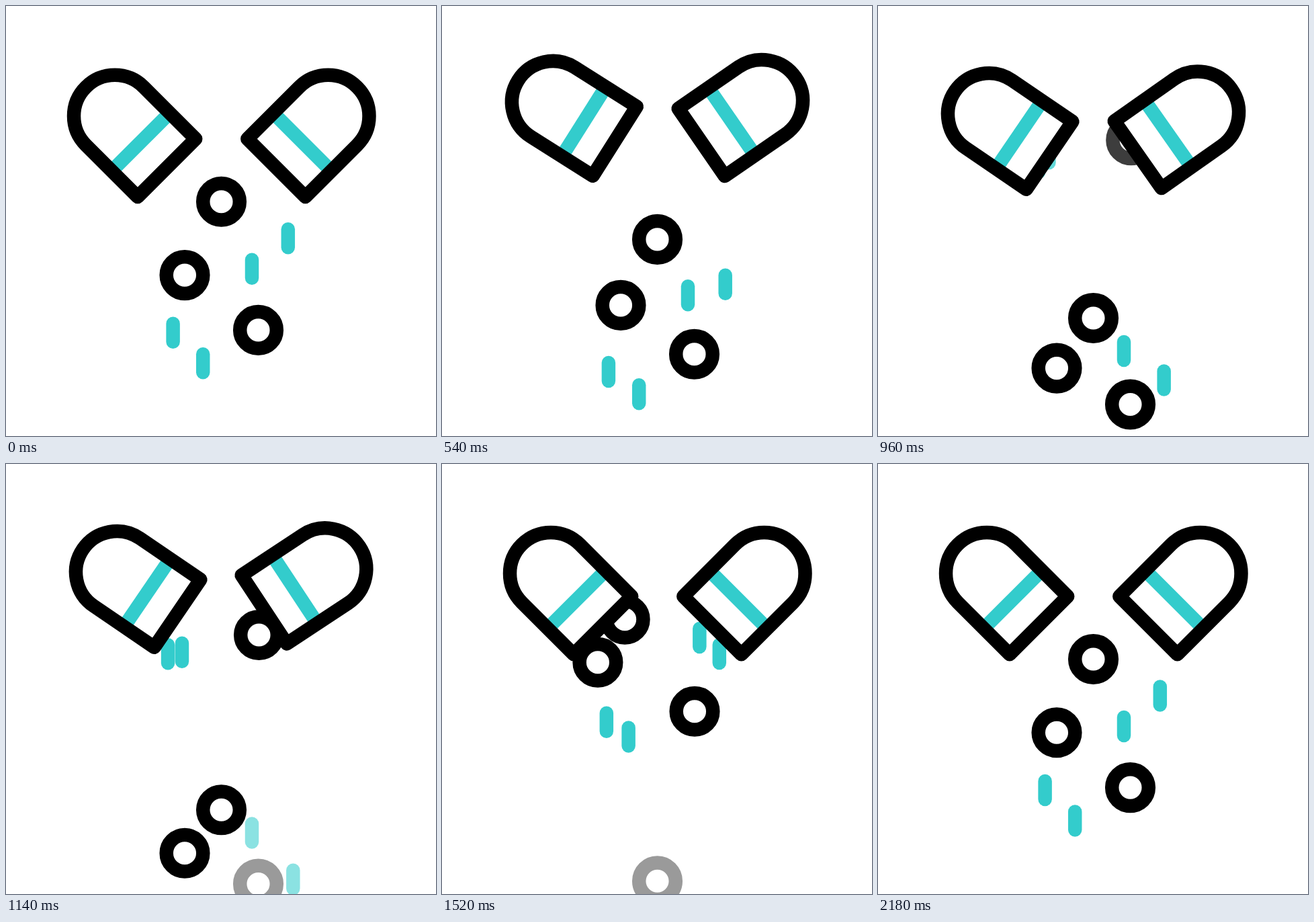
These frames come from a looping animation (640x640 px, 2420 ms). An HTML page with a canvas:

```html
<!DOCTYPE html>
<html lang="en">
<head>
<meta charset="utf-8">
<title>Opening capsule</title>
<style>
  html, body { margin: 0; height: 100%; overflow: hidden; background: #fff; }
  canvas { display: block; }
</style>
</head>
<body>
<canvas id="stage" width="640" height="640"></canvas>
<script>
const ctx = document.getElementById('stage').getContext('2d');
const LOOP = 2420, FALL = 340, LAND = 2180, LINE = 20.5;
const BLACK = '#000', TEAL = '#3cc';

// x, y: resting place; vx, vy: fall speed in px/ms; fade: start of fade-out;
// enter, dx, dy: when and from which offset the replacement leaves its capsule
const grains = [
  { ball: true, x: 320.5, y: 290.5, vx: 0, vy: .279, fade: 1400, enter: 1180, dx: -86.5, dy: -106 },
  { ball: true, x: 266, y: 399.8, vx: 0, vy: .223, fade: 1205, enter: 1180, dx: -61, dy: -187 },
  { ball: true, x: 375.5, y: 481.6, vx: 0, vy: .178, fade: 1020, enter: 900, dx: 1.3, dy: -298 },
  { x: 366, y: 390.4, vx: 0, vy: .197, fade: 1055, enter: 1180, dx: 31, dy: -236 },
  { x: 419.8, y: 345, vx: .0094, vy: .34, fade: 1055, enter: 1180, dx: -12.5, dy: -112 },
  { x: 248.6, y: 485.5, vx: -.0035, vy: .289, fade: 1055, enter: 900, dx: -9.9, dy: -266 },
  { x: 293.2, y: 531, vx: 0, vy: .228, fade: 1055, enter: 900, dx: -41, dy: -329 }
];

// Keys: time, centre x, centre y, tilt in degrees
const leftKeys = [
  [340, 162, 163, 45], [540, 165, 143, 32.3], [740, 165, 161, 34.3],
  [1140, 165, 161, 34.3], [1240, 165, 156.5, 31.5], [1440, 162, 163, 45]
];
const rightKeys = [
  [340, 479.5, 163, 45], [540, 476, 141, 34.6], [740, 476, 158.5, 35.1],
  [1060, 476, 158.5, 35.1], [1220, 474.5, 154.5, 31.8], [1460, 479.5, 163, 45]
];

const clamp = v => Math.max(0, Math.min(1, v));
const smooth = p => p * p * (3 - 2 * p);

// Share of the way still to go: linear start, soft landing
function remaining(t, start) {
  const w = clamp((LAND - t) / (LAND - start));
  let u = w;
  for (let i = 0; i < 16; i++) u = w - .5 * u * u * (1 - u);
  return u * u * (2.5 - 1.5 * u);
}

function pose(keys, t) {
  let i = 0;
  while (i < keys.length - 2 && t >= keys[i + 1][0]) i++;
  const [a, b] = [keys[i], keys[i + 1]];
  const p = smooth(clamp((t - a[0]) / (b[0] - a[0])));
  return a.slice(1).map((v, k) => v + (b[k + 1] - v) * p);
}

function stroke(color, cap = 'round') {
  ctx.strokeStyle = color;
  ctx.lineCap = cap;
  ctx.stroke();
}

function drawGrain(grain, x, y, alpha) {
  ctx.globalAlpha = alpha;
  ctx.beginPath();
  if (grain.ball) {
    ctx.arc(x, y, 27.3, 0, 2 * Math.PI);
    stroke(BLACK);
  } else {
    ctx.moveTo(x, y - 13.5);
    ctx.lineTo(x, y + 13.5);
    stroke(TEAL);
  }
  ctx.globalAlpha = 1;
}

function drawCapsule([x, y, tilt], flip, shift) {
  ctx.save();
  ctx.translate(x, y + shift);
  ctx.scale(flip, 1);
  ctx.rotate(tilt * Math.PI / 180);
  const shell = new Path2D();
  shell.arc(0, 0, 61, Math.PI / 2, Math.PI * 1.5);
  shell.lineTo(109, -61);
  shell.lineTo(109, 61);
  shell.closePath();
  ctx.fillStyle = '#fff';
  ctx.fill(shell);
  ctx.beginPath();
  ctx.moveTo(54.5, -61);
  ctx.lineTo(54.5, 61);
  stroke(TEAL, 'butt');
  ctx.strokeStyle = BLACK;
  ctx.stroke(shell);
  ctx.restore();
}

function draw(t) {
  ctx.fillStyle = '#fff';
  ctx.fillRect(0, 0, 640, 640);
  ctx.lineWidth = LINE;
  ctx.lineJoin = 'round';

  for (const g of grains) {
    const fallen = Math.max(0, t - FALL);
    const alpha = 1 - clamp((t - g.fade) / 200);
    if (alpha > 0) drawGrain(g, g.x + g.vx * fallen, g.y + .8 + g.vy * fallen, alpha);
    if (t > g.enter) {
      const r = remaining(t, g.enter);
      drawGrain(g, g.x + g.dx * r, g.y + g.dy * r, clamp((t - g.enter) / 80));
    }
  }

  const shift = t < 360 ? .8 : 0;
  drawCapsule(pose(leftKeys, t), 1, shift);
  drawCapsule(pose(rightKeys, t), -1, shift);
}

const begin = performance.now();
function tick() {
  draw((performance.now() - begin) % LOOP);
  requestAnimationFrame(tick);
}
tick();
</script>
</body>
</html>
```
